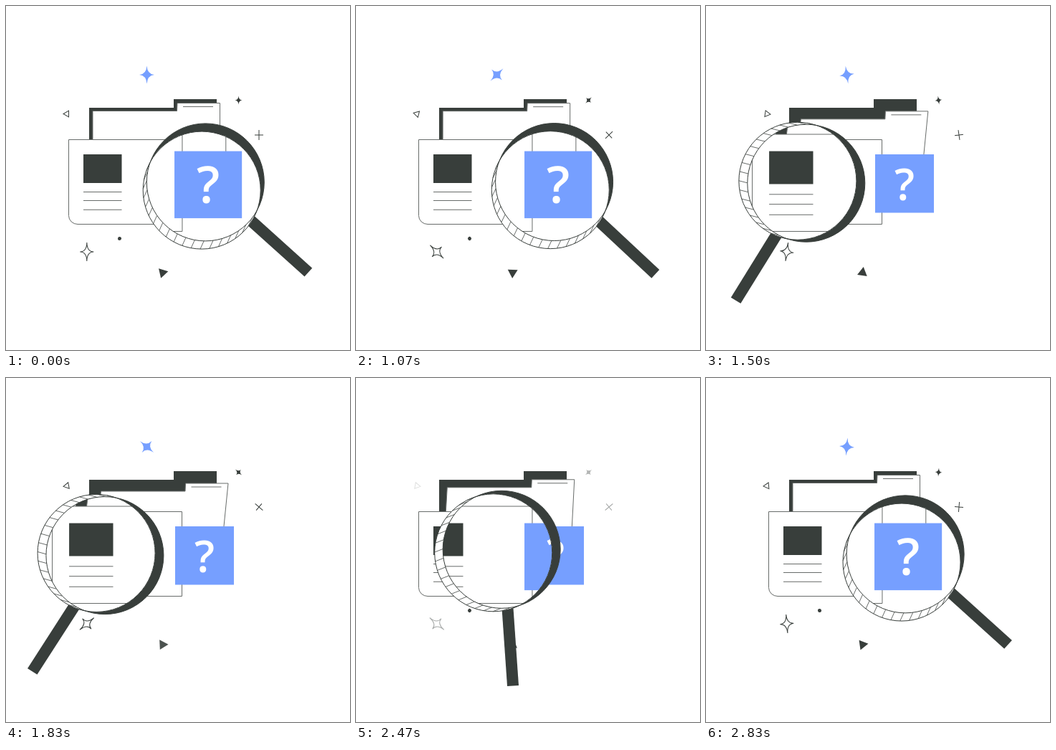
An HTML page with a canvas that plays this animation: 480x480 px, repeating every 2.87 s.

```html
<!DOCTYPE html>
<html>
<head>
<meta charset="utf-8">
<style>
html, body { margin: 0; width: 100%; height: 100%; overflow: hidden; background: #fff; }
canvas { display: block; }
</style>
</head>
<body>
<canvas id="stage" width="480" height="480"></canvas>
<script>
const ctx = document.getElementById('stage').getContext('2d');
const LOOP = 2870, DARK = '#383e3b', BLUE = '#769fff', LINE = '#686c6a', WHITE = '#fff';
const RADIUS = 82, ZOOM = 1.148;
const clamp = v => Math.min(1, Math.max(0, v));
const mix = (a, b, k) => a + (b - a) * k;

// Cubic bezier easing (.6, 0, .01, 1)
function ease(x) {
  x = clamp(x);
  let lo = 0, hi = 1, s = .5;
  for (let i = 0; i < 24; i++) {
    s = (lo + hi) / 2;
    const bx = 1.8 * s * (1 - s) ** 2 + .03 * s * s * (1 - s) + s ** 3;
    if (bx < x) lo = s; else hi = s;
  }
  return s * s * (3 - 2 * s);
}

function polygon(points) {
  const path = new Path2D();
  points.forEach(([x, y]) => path.lineTo(x, y));
  path.closePath();
  return path;
}

function circle(x, y, r) {
  const path = new Path2D();
  path.arc(x, y, r, 0, 7);
  return path;
}

function star(rx, ry, waist) {
  return new Path2D(`M0 ${-ry}Q${waist} ${-waist} ${rx} 0Q${waist} ${waist} 0 ${ry}` +
    `Q${-waist} ${waist} ${-rx} 0Q${-waist} ${-waist} 0 ${-ry}Z`);
}

function triangle(r, degrees) {
  return polygon([0, 120, 240].map(a => {
    const rad = (a + degrees) * Math.PI / 180;
    return [r * Math.cos(rad), r * Math.sin(rad)];
  }));
}

function line(x1, y1, x2, y2) {
  ctx.beginPath();
  ctx.moveTo(x1, y1);
  ctx.lineTo(x2, y2);
  ctx.stroke();
}

// dips: [centre, half length of the gap, fade length]
const sparkles = [
  { x: 196.5, y: 96, spin: -1, shape: star(10.5, 12.5, .8), fill: BLUE, dips: [[2470, 20, 180]] },
  { x: 324.5, y: 131.5, spin: -1, shape: star(5, 6, .4), fill: DARK, dips: [[2540, 0, 180]] },
  { x: 353, y: 180, spin: -1, shape: new Path2D('M-6 0H6M0 -7V7'), dips: [[570, 0, 300], [2340, 0, 300]] },
  { x: 85, y: 150.5, spin: 1, shape: triangle(5, 60), dips: [[2500, 0, 180]] },
  { x: 112.8, y: 343, spin: 1, shape: star(9.5, 13, .2), dips: [[570, 0, 300], [2340, 0, 300]] },
  { x: 158.5, y: 324.5, spin: 1, shape: circle(0, 0, 2.5), fill: DARK, dips: [[670, 60, 220]] },
  { x: 218.5, y: 372, spin: -1, shape: triangle(8, 107), fill: DARK, dips: [[570, 0, 300], [2100, 0, 300]] }
];

function drawSparkle({ x, y, spin, shape, fill, dips }, t) {
  ctx.save();
  ctx.translate(x, y);
  ctx.rotate(spin * t / LOOP * 2 * Math.PI);
  for (const [c, gap, fade] of dips) ctx.globalAlpha *= clamp((Math.abs(t - c) - gap) / fade);
  if (fill) {
    ctx.fillStyle = fill;
    ctx.fill(shape);
  } else {
    ctx.strokeStyle = DARK;
    ctx.stroke(shape);
  }
  ctx.restore();
}

const folder = polygon([[116, 142], [234, 142], [234, 130], [294, 130], [294, 262], [116, 262]]);
const page = new Path2D('M87.5 186.5H245.5V304.5H100A12.5 12 0 0 1 87.5 292.5Z');

function drawFolder(p, width) {
  const d = 11.5 * p;
  ctx.lineWidth = width;
  ctx.strokeStyle = LINE;
  ctx.fillStyle = DARK;
  ctx.fill(folder);

  // Sheet leaning out of the folder
  const sheet = polygon([[121 + d, 146.5 + d], [238.5 + d, 146.5 + d], [239 + d, 135.5 + d],
    [298.5 + d, 135.5 + d], [298.5, 262], [121, 262]]);
  ctx.fillStyle = WHITE;
  ctx.fill(sheet);
  ctx.stroke(sheet);
  line(247 + d, 140.5 + d, 289 + d, 140.5 + d);

  ctx.fillStyle = WHITE;
  ctx.fill(page);
  ctx.stroke(page);
  ctx.fillStyle = DARK;
  ctx.fillRect(108, 207, 53.5, 40);
  for (const y of [259.5, 271.5, 284.3]) line(108, y, 161.5, y);

  ctx.fillStyle = BLUE;
  ctx.fillRect(236, 207, 82, 81.5);
  ctx.fillStyle = WHITE;
  ctx.font = '600 62px "Open Sans", "Noto Sans", sans-serif';
  ctx.textAlign = 'center';
  ctx.fillText('?', 277, 270.5);
}

function drawLens(p) {
  const x = mix(275.75, 132, p);
  const y = mix(251.5, 246, p) - 28 * p * (1 - p);
  const angle = mix(42, 122.8, p) * Math.PI / 180;

  ctx.save();
  ctx.translate(x, y);
  ctx.rotate(angle);
  ctx.fillStyle = DARK;
  ctx.fillRect(70, -16.5, 119, 16);
  ctx.restore();

  // Two equal discs form the rim; their overlap is the glass
  const tilt = angle - 1.876;
  const dx = 6.15 * Math.cos(tilt), dy = 6.15 * Math.sin(tilt);
  const front = circle(x + dx, y + dy, RADIUS);
  const back = circle(x - dx, y - dy, RADIUS);
  ctx.fillStyle = DARK;
  ctx.fill(front);
  ctx.fillStyle = WHITE;
  ctx.fill(back);

  ctx.lineWidth = 1;
  ctx.strokeStyle = LINE;
  for (let a = 94; a < 270; a += 9) {
    const rad = tilt + a * Math.PI / 180;
    const hx = x - dx + RADIUS * Math.cos(rad), hy = y - dy + RADIUS * Math.sin(rad);
    line(hx, hy, hx + 2 * dx, hy + 2 * dy);
  }

  ctx.save();
  ctx.clip(front);
  ctx.clip(back);
  ctx.fillStyle = WHITE;
  ctx.fillRect(0, 0, 480, 480);
  ctx.translate(242.5, 237);
  ctx.scale(ZOOM, ZOOM);
  ctx.translate(-242.5, -237);
  drawFolder(p, 1 / ZOOM);
  ctx.restore();

  ctx.lineWidth = 1;
  ctx.strokeStyle = DARK;
  ctx.stroke(back);
  ctx.stroke(front);
}

function draw() {
  const t = performance.now() % LOOP;
  const p = ease((t - 1008) / 600) - ease((t - 2264) / 600);
  ctx.fillStyle = WHITE;
  ctx.fillRect(0, 0, 480, 480);
  drawFolder(p, 1);
  sparkles.forEach(s => drawSparkle(s, t));
  drawLens(p);
  requestAnimationFrame(draw);
}
draw();
</script>
</body>
</html>
```
